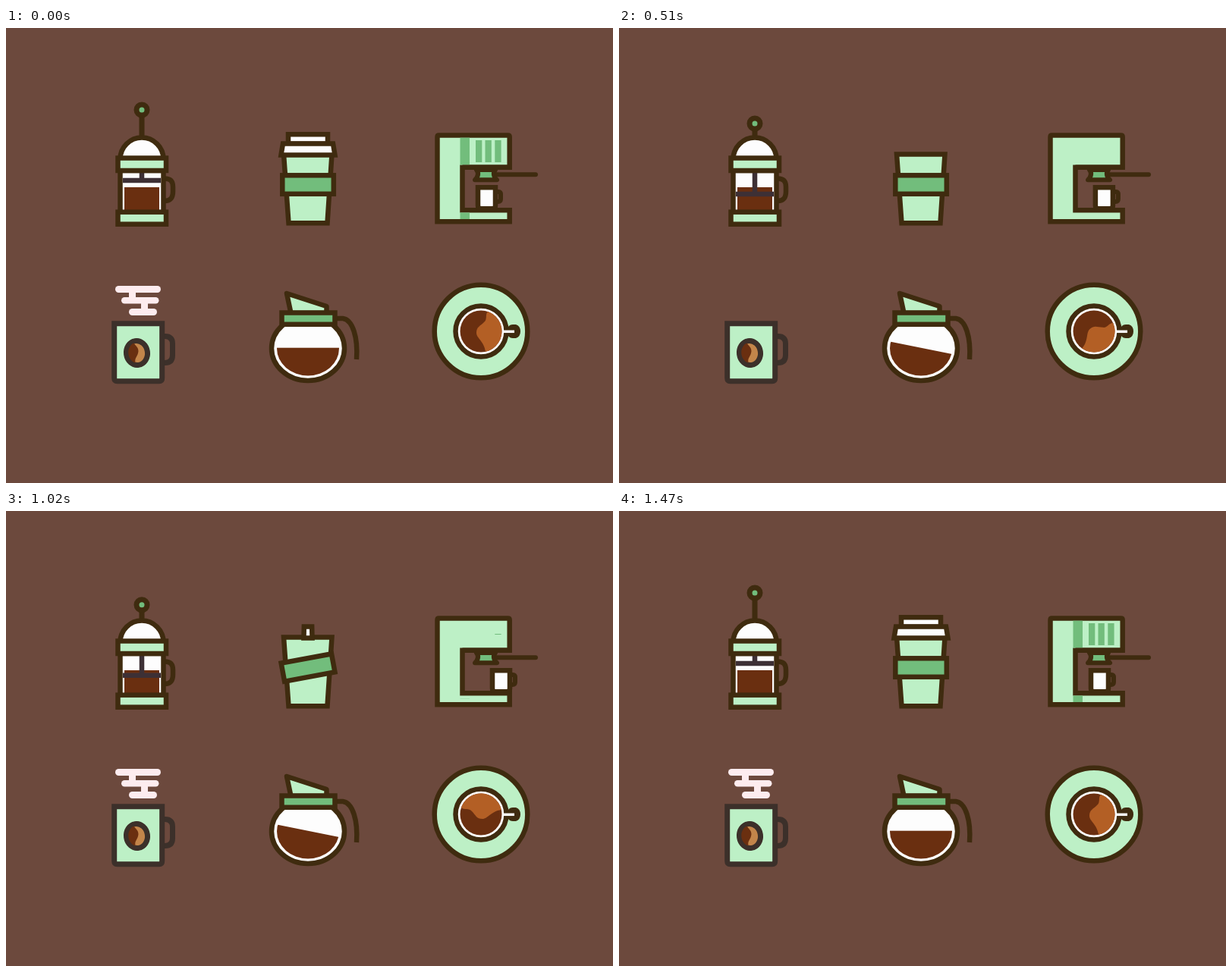
An HTML page that plays this animation: 800x600 px, repeating every 1.68 s.

```html
<!DOCTYPE html>
<html lang="en">
<head>
<meta charset="utf-8">
<title>Coffee icons</title>
<style>
  html, body { margin: 0; width: 100%; height: 100%; overflow: hidden; background: #6c493d; }
  svg { display: block; width: 800px; height: 600px; }
  .icon { stroke: #3f2b0f; stroke-width: 6.5; }
  .mug { stroke: #3c302a; stroke-width: 7; }
  .mint { fill: #bdf0c6; }
  .green { fill: #72bd7c; }
  .white { fill: #fdfdfd; }
  .coffee { fill: #6a2f10; }
  .crema { fill: #b35f25; }
  .line { fill: none; }
  .flat { stroke: none; }
  .lid { vector-effect: non-scaling-stroke; }
</style>
</head>
<body>
<svg viewBox="0 0 800 600">
  <defs>
    <clipPath id="pot"><ellipse cx="398" cy="422.5" rx="41" ry="36"/></clipPath>
    <clipPath id="wipe"><rect id="wipeBox" x="140" y="340" width="70" height="39"/></clipPath>
    <clipPath id="bean"><ellipse rx="14" ry="16"/></clipPath>
  </defs>

  <!-- French press -->
  <g class="icon">
    <g id="knob">
      <path class="line" d="M179 116v34" stroke-width="7"/>
      <circle class="green" cx="179" cy="108" r="7" stroke-width="7"/>
    </g>
    <path class="line" d="M209 198.5c8 0 11 4 11 11v6c0 8-3 12.500-11 12.500" />
    <path class="white" d="M150.500 173a28.500 28.500 0 0 1 57 0z"/>
    <rect class="white" x="150.500" y="188" width="57" height="56"/>
    <rect class="coffee flat" x="156" y="210" width="46" height="32"/>
    <g stroke="#3d3035">
      <path id="rod"/>
      <path id="plate" d="M154 201h50"/>
    </g>
    <rect class="mint" x="147.500" y="171.500" width="63.500" height="16.500"/>
    <rect class="mint" x="147.500" y="242.700" width="63.500" height="16"/>
  </g>

  <!-- Takeaway cup -->
  <g class="icon">
    <path class="mint" d="M366 166.500h63.500l-6 90.700h-51z"/>
    <rect id="sleeve" class="green" x="364.300" y="194.300" width="67.500" height="24.500"/>
    <rect id="cap" class="white lid" x="372" y="140.300" width="52" height="12.500"/>
    <path id="lid" class="white lid" d="M365 152.500h66l2.500 15h-71z"/>
  </g>

  <!-- Espresso machine -->
  <g class="icon">
    <path class="mint" d="M568.500 255.300V143.500q0-2 2-2H661.500q2.200 0 2.200 2.200V183.700H601.500V240.300H663.700V255.300z"/>
    <g id="bars" class="green flat">
      <rect x="598.500" y="144.700" width="12.500" height="35.800"/>
      <rect x="619" y="148" width="8.300" height="29"/>
      <rect x="631.500" y="148" width="8.300" height="29"/>
      <rect x="644.300" y="148" width="8.300" height="29"/>
      <rect x="598.500" y="243.500" width="12.500" height="8.500"/>
    </g>
    <path class="green" d="M620 187h25q-5 6 2 13.300h-29q7-7.300 2-13.300z" stroke-width="6" stroke-linejoin="round"/>
    <path class="line" d="M646 193.200h52" stroke-width="6" stroke-linecap="round"/>
    <path class="line" d="M601.500 183.700h62.200"/>
    <g id="cup">
      <path class="line" d="M645 216h4q3 0 3 3.500v6q0 3.500-3.500 3.500h-3.500" stroke-width="6"/>
      <path class="white" d="M622 210.200h23v24q0 4-4 4h-15q-4 0-4-4z"/>
    </g>
  </g>

  <!-- Steaming mug -->
  <g clip-path="url(#wipe)" fill="#fdecef">
    <rect x="144" y="340" width="60" height="9" rx="4.500"/>
    <rect x="152" y="355" width="49.500" height="8.500" rx="4.250"/>
    <rect x="162" y="370" width="37" height="9" rx="4.500"/>
    <path d="M162 348h9v8h-9zM178 363h9v8h-9z"/>
  </g>
  <g class="mug">
    <path class="line" d="M207 406.500h2.500q10 0 10 10v15q0 10-10 10h-2.500"/>
    <path class="mint" d="M142.700 389.700h63v72q0 4-4 4h-55q-4 0-4-4z"/>
    <g transform="translate(172.500 428.500)rotate(-8)">
      <ellipse rx="14" ry="16" fill="#c3854a"/>
      <path class="coffee flat" clip-path="url(#bean)" d="M-3-17C-2-9 4-8 2-1S-6 6-3 17H-16V-17z"/>
      <ellipse class="line" rx="14" ry="16.300" stroke-width="5.500"/>
    </g>
  </g>

  <!-- Carafe -->
  <g class="icon">
    <path class="line" d="M435 383h9c13 2 20 25 18 54"/>
    <ellipse class="white" cx="398" cy="422.500" rx="48" ry="42.500"/>
    <g clip-path="url(#pot)"><rect id="liquid" class="coffee flat" x="340" y="421.700" width="116" height="60"/></g>
    <path class="mint" d="M370 350l52.500 17v9H375.500z" stroke-linejoin="round"/>
    <rect class="green" x="363.500" y="375.500" width="70" height="15.300"/>
  </g>

  <!-- Cup on saucer -->
  <g class="icon" transform="translate(626 400)" stroke-width="7">
    <circle class="mint" r="61.300"/>
    <path d="M32-6h4q2-3 6-3h4q6 2 6 9t-6 9h-4q-4 0-6-3h-4z" fill="#3f2b0f" stroke="none"/>
    <circle class="white" r="33.500"/>
    <path class="line" d="M28 .3h16" stroke="#fdfdfd" style="stroke-width:3.500"/>
    <circle class="coffee flat" r="27.500"/>
    <path id="swirl" class="crema flat" d="M9-26C5-22 9-16 4-12-1-7-6-6-6 2-6 9 4 13 6 26.800A27.500 27.500 0 0 0 9-26z"/>
  </g>
</svg>
<script>
  const LOOP = 1680, STEP = 30;
  const $ = id => document.getElementById(id);
  const move = (id, transform) => $(id).setAttribute('transform', transform);
  const ramp = (t, from, to) => {
    const p = Math.min(1, Math.max(0, (t - from) / (to - from)));
    return p * p * (3 - 2 * p);
  };
  // Eased value along [time, value] keys
  const track = (t, ...keys) => keys.slice(1).reduce(
    (v, [time, value], i) => v + (value - keys[i][1]) * ramp(t, keys[i][0], time), keys[0][1]);
  const scaleX = s => `translate(398)scale(${s} 1)translate(-398)`;

  const barOut = [18, 70, 110, 133, 133];
  const barIn = [1200, 1143, 1098, 1000, 1000];

  function draw(t) {
    const press = 18 * (ramp(t, 60, 520) - ramp(t, 960, 1230));
    move('knob', `translate(0 ${press})`);
    move('plate', `translate(0 ${press})`);
    $('rod').setAttribute('d', `M179 188V${201 + press}`);

    const lift = track(t, [120, 0], [260, -15], [1230, -15], [1410, 0]);
    move('cap', `translate(0 ${lift})` + scaleX(track(t, [240, 1], [390, 0], [1080, 0], [1230, 1])));
    move('lid', scaleX(track(t, [0, 1], [160, 0], [980, 0], [1140, 1])));
    move('sleeve', `rotate(${track(t, [570, 0], [780, 5], [1020, -10.5], [1220, 0])} 398 206.5)`);

    [...$('bars').children].forEach((bar, i) => {
      const s = 1 - ramp(t, barOut[i], barOut[i] + 180) + ramp(t, barIn[i], barIn[i] + 180);
      const y = i < 4 ? 162.5 : 247.7;
      bar.setAttribute('transform', `translate(0 ${y})scale(1 ${s})translate(0 ${-y})`);
    });
    move('cup', `translate(${19 * (ramp(t, 410, 680) - ramp(t, 1192, 1462))})`);

    // Steam leaves upwards, then grows again from the mug
    const leaving = t < 400;
    const height = 39 * (leaving ? 1 - ramp(t, 0, 170) : ramp(t, 640, 930));
    $('wipeBox').setAttribute('y', leaving ? 340 : 379 - height);
    $('wipeBox').setAttribute('height', height);

    move('liquid', `rotate(${track(t, [210, 0], [510, 11.3], [780, -11.3], [1020, 11.3], [1350, 0])} 398 421.7)`);
    move('swirl', `rotate(${track(t, [430, 0], [730, 270], [1020, 270], [1250, 360])})`);
  }

  function tick() {
    const t = performance.now() % LOOP;
    draw(Math.floor(t / STEP) * STEP);
    requestAnimationFrame(tick);
  }
  tick();
</script>
</body>
</html>
```
